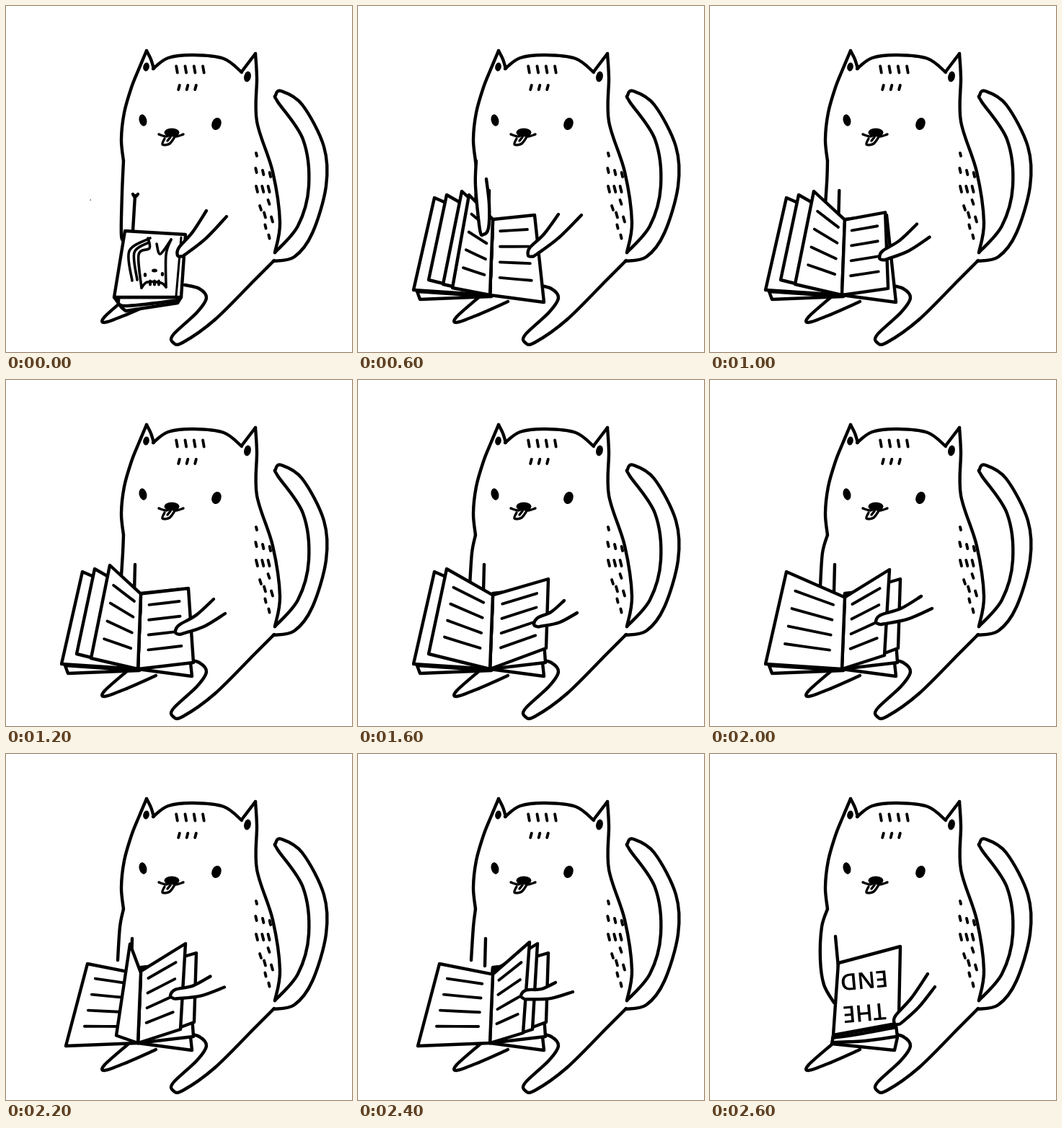
Animation of 480 by 480 pixels, one loop 2.8 s. Source, as an HTML page with a canvas:

```html
<!DOCTYPE html>
<html lang="en">
<head>
<meta charset="utf-8">
<title>Reading cat</title>
<style>
  html, body { margin: 0; width: 100%; height: 100%; overflow: hidden; background: #fff; }
  canvas { display: block; width: 480px; height: 480px; }
</style>
</head>
<body>
<canvas id="stage" width="480" height="480"></canvas>
<script>
const ctx = document.getElementById('stage').getContext('2d');
const LOOP = 2800, STEP = 200, PEN = 4.4, THIN = 3.9;

// Points are written as "x,y x,y ...".
const points = text => text.split(' ').map(p => p.split(',').map(Number));
const lerp = (p, q, t) => p.map((v, k) => v + (q[k] - v) * t);
const mix = (a, b, t) => a.map((p, i) => lerp(p, b[i], t));

function finish(width, fill) {
  if (fill) { ctx.fillStyle = fill; ctx.fill(); }
  ctx.lineWidth = width;
  ctx.stroke();
}

// Smooth stroke through every point.
function curve(pts, width = PEN, fill) {
  ctx.beginPath();
  ctx.moveTo(...pts[0]);
  for (let i = 0; i < pts.length - 1; i++) {
    const a = pts[i - 1] || pts[i], b = pts[i], c = pts[i + 1], d = pts[i + 2] || c;
    ctx.bezierCurveTo(
      b[0] + (c[0] - a[0]) / 6, b[1] + (c[1] - a[1]) / 6,
      c[0] - (d[0] - b[0]) / 6, c[1] - (d[1] - b[1]) / 6, c[0], c[1]);
  }
  finish(width, fill);
}

// Separate strokes divided by " / ".
const strokes = (text, width) => text.split(' / ').forEach(s => curve(points(s), width));

function sheet(pts) {
  ctx.beginPath();
  pts.forEach(p => ctx.lineTo(...p));
  ctx.closePath();
  finish(PEN, '#fff');
}

function blob(x, y, rx, ry, turn = 0) {
  ctx.beginPath();
  ctx.ellipse(x, y, rx, ry, turn, 0, 7);
  ctx.fillStyle = '#000';
  ctx.fill();
}

// Row of short fur marks.
function fur(x, y, count, gap, height, lean, drop = 0) {
  for (let k = 0; k < count; k++) {
    const cx = x + k * gap, cy = y + k * drop;
    curve([[cx - lean, cy - height / 2], [cx + lean, cy + height / 2]], THIN);
  }
}

function drawCat() {
  strokes('163,215 160,185 164,148 174,113 184,88 195,62 / 195,62 201,74 205,87 / 204,87 225,72 260,68 302,73 327,92 / 327,91 346,66 / 346,66 348,100 348,160 370,230 380,300 373,342');
  strokes('373,342 405,305 420,250 412,185 377,133 374,124 382,118 411,137 441,195 444,250 425,315 400,348 371,354');
  strokes('372,353 345,380 290,435 245,467 232,467 232,456 265,425 278,405 268,392 248,387');
  strokes('170,402 137,431 137,439 165,429 208,410');

  blob(190, 158.5, 5.3, 8.3, -0.25);
  blob(292, 163.5, 6.5, 8.8, 0.35);
  blob(194.5, 84.5, 4.3, 6, 0.2);
  blob(335, 98, 4.8, 7.5, 0.2);
  blob(230, 175.5, 10.5, 6);
  strokes('212,178 222,181 230,178 236,181 246,178 / 220,184 217,192 227,191 235,180 / 228,182 224,187', 3.4);

  fur(237, 88, 4, 12.3, 9, 0.8);
  fur(240, 113, 3, 11.5, 6, -0.8);
  fur(347.5, 206, 1, 0, 4, 0.5);
  fur(347, 228, 3, 9.7, 6, 0.7, 3);
  fur(348, 254, 3, 8.3, 8, 1);
  fur(353, 280, 2, 11.5, 6, 1, -8);
  fur(359, 290, 2, 10, 7, 1, 6);
  fur(360, 306, 2, 5, 5, 0.6, 14);
}

// An arm runs from its upper shoulder to the paw and back to the lower one.
function drawArm([top, low, paw]) {
  const [mx, my] = lerp(top, low, 0.5).map((v, k) => v - paw[k]);
  const length = Math.hypot(mx, my), dx = mx / length, dy = my / length;
  const near = (along, across) => [paw[0] + dx * along + dy * across, paw[1] + dy * along - dx * across];
  const sag = (a, b) => lerp(a, b, 0.5).map((v, k) => v + 4 * k);
  const upper = near(9, 6), lower = near(9, -7);
  curve([top, sag(top, upper), upper, paw, near(3, -5), lower, sag(lower, low), low], PEN, '#fff');
}

function drawSleeve(x) {
  curve([[163, 215], [x + 3, 240], [x, 286]]);
  curve([[x + 20, 256], [x + 19, 294]]);
}

// Even text lines that follow the slant of a page.
function drawText([topOut, lowOut, lowIn, topIn]) {
  for (let k = 0; k < 4; k++) {
    const v = 0.16 + 0.2 * k;
    const outer = lerp(topOut, lowOut, v), inner = lerp(topIn, lowIn, v);
    curve([lerp(outer, inner, 0.2), lerp(outer, inner, 0.82)], THIN);
  }
}

// Key poses: outer page edges, arm and sleeve position.
const spreads = [
  ['154,262 131,391', '245,290 258,411', '278,289 310,290 236,346', 162],
  ['144,257 118,386', '253,289 260,392', '288,304 304,324 235,350', 159],
  ['123,262 98,380', '264,276 261,372', '286,306 304,323 244,339', 155],
  ['106,266 77,394', '249,263 242,382', '293,300 308,317 230,335', 153],
  ['113,291 83,405', '238,261 229,387', '274,317 298,330 226,335', 157]
].map(([left, right, arm, sleeve], n) => {
  const hinge = [[183, 401], [187, 296 + 0.6 * n * n]];
  return { left: [...points(left), ...hinge], right: [...points(right), ...hinge], arm: points(arm), sleeve };
});

function drawStacks(leftTop, rightTop) {
  for (let i = 0; i <= rightTop; i++) sheet(spreads[i].right);
  drawText(spreads[rightTop].right);
  if (leftTop < 4) sheet(points('82,396 86,407 185,403'));
  for (let i = Math.max(3, leftTop); i >= leftTop; i--) sheet(spreads[i].left);
  drawText(spreads[leftTop].left);
}

function openBook(n) {
  const { sleeve, arm } = spreads[n];
  drawSleeve(sleeve);
  drawStacks(n, n);
  if (n === 0) {
    curve(points('164,215 163,250 169,310 174,317 181,308 182,275 178,240'), PEN, '#fff');
  }
  drawArm(arm);
}

// The top left leaf swings over the spine onto the right stack.
function turnLeaf(n, t) {
  const from = spreads[n], to = spreads[n + 1];
  const leaf = mix(from.left, to.right, t);
  drawSleeve(from.sleeve + (to.sleeve - from.sleeve) * t);
  drawStacks(n + 1, n);
  sheet(leaf);
  if (t > 0.5) drawText(leaf);
  drawArm(mix(from.arm, to.arm, t));
}

function frontCover() {
  curve([[117, 269], [117.5, 269]], 1.2);
  strokes('163,215 161,260 160,318 165,325 / 179,263 176,312 / 176,261 179,265 183,261');
  sheet(points('150,404 160,418 166,423 238,412 243,404'));
  strokes('156,406 165,416 240,408');
  sheet(points('165,312 249,317 243,404 150,404'));
  strokes('243,321 236,402', 3);
  strokes('200,322 171,340 175,381 / 198,328 178,342 182,380 / 197,322 199,336 184,345 188,391 / 188,391 196,383 215,384 222,390 / 222,390 222,345 229,324 / 229,324 214,344 209,330', 3.6);
  blob(193, 373, 2.2, 3);
  blob(217, 372, 2.2, 3);
  blob(206, 367, 4, 2.5);
  fur(200, 384, 3, 6, 5, 0);
  drawArm(points('278,284 306,292 238,346'));
}

function backCover() {
  strokes('163,215 155,240 153,285 158,320 172,345 / 174,253 178,296');
  sheet(points('171,390 169,402 256,411 260,393 258,376'));
  strokes('170,394 210,388 258,379 / 172,400 215,398 258,392');
  sheet(points('178,290 264,267 262,363 258,374 171,390'));
  ctx.fillStyle = '#000';
  ctx.textAlign = 'center';
  ctx.font = '600 32px "Open Sans", sans-serif';
  ['END', 'THE'].forEach((word, line) => {
    ctx.save();
    ctx.translate(213, 303 + 45 * line);
    ctx.rotate(Math.PI - 0.09);
    ctx.fillText(word, 0, 0);
    ctx.restore();
  });
  drawArm(points('302,305 312,323 256,374'));
}

function drawPose(step) {
  if (step < 3) return frontCover();
  if (step === 13) return backCover();
  if (step < 6) return step === 3 ? openBook(0) : turnLeaf(0, step === 4 ? 0.5 : 0.9);
  const n = Math.floor(step / 2) - 2;
  return step % 2 ? turnLeaf(n, 0.5) : openBook(n);
}

function render() {
  ctx.fillStyle = '#fff';
  ctx.fillRect(0, 0, 480, 480);
  ctx.strokeStyle = '#000';
  ctx.lineCap = ctx.lineJoin = 'round';
  drawCat();
  drawPose(Math.floor((performance.now() % LOOP) / STEP));
  requestAnimationFrame(render);
}
render();
</script>
</body>
</html>
```
